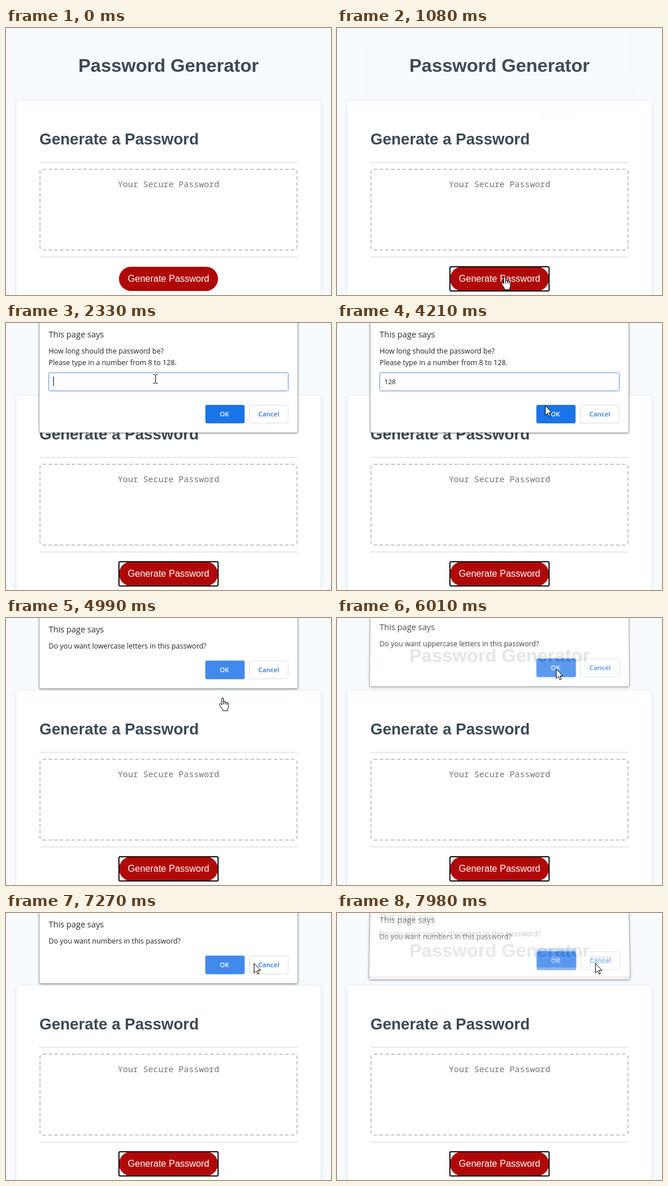
An HTML page for the animation above (8000 ms loop, 564 by 463 pixels).

```html
<!DOCTYPE html>
<html lang="en">
<head>
<meta charset="utf-8">
<title>Password Generator</title>
<style>
  html, body { margin: 0; width: 100%; height: 100%; overflow: hidden; background: #f7fbff; }
  #stage { position: relative; width: 564px; height: 463px; overflow: hidden; }
  #stage > *, .dialog svg { position: absolute; }
  svg { left: 0; top: 0; overflow: visible; }
  #card {
    left: 18px; top: 126px; width: 528px; height: 400px; border-radius: 5px; background: #fff;
    box-shadow: 0 1px 6px rgba(0,0,0,.1), 0 1px 1px rgba(0,0,0,.2);
  }
  .rule { left: 58px; width: 448px; height: 2px; background: #e7e9eb; }
  #area {
    left: 58px; top: 244px; width: 448px; height: 142px; box-sizing: border-box;
    border: 2px dashed #c2c5ca; border-radius: 6px;
  }
  #button {
    left: 196px; top: 414px; width: 172px; height: 42px; border-radius: 21px; background: #b00808;
  }
  #ring {
    left: 195px; top: 413px; width: 174px; height: 44px; box-sizing: border-box;
    border: 2px solid #101010; border-radius: 3px;
  }
  .head { font-family: "Liberation Sans", Arial, sans-serif; font-weight: bold; fill: #3b4954; }
  .label { font: 16px "Liberation Sans", Arial, sans-serif; fill: #fff; }
  .mono { font: 14.67px "Noto Sans Mono", monospace; fill: #757575; }
  .dialog {
    left: 58px; top: -20px; width: 448px; background: #fff; border-radius: 2px;
    transform-origin: 50% 20px;
    box-shadow: 0 0 0 1px rgba(0,0,0,.2), 0 1px 4px rgba(0,0,0,.45);
  }
  .dialog svg { left: -58px; top: 20px; }
  .dialog text { font: 12.3px "Open Sans", "Noto Sans", sans-serif; fill: #202124; }
  .dialog .says { font-size: 14.3px; fill: #2b2d30; }
  .dialog .btn { font-size: 11.4px; font-weight: 600; text-anchor: middle; }
  .dialog .digits { font-size: 11.6px; }
</style>
</head>
<body>
<div id="stage">
  <svg width="564" height="463">
    <text class="head" x="282" y="76" font-size="32" text-anchor="middle">Password Generator</text>
  </svg>
  <div id="card"></div>
  <div class="rule" style="top:232px"></div>
  <div id="area"></div>
  <div class="rule" style="top:396px"></div>
  <div id="button"></div>
  <div id="ring"></div>
  <svg width="564" height="463">
    <text class="head" x="58" y="202" font-size="27.2">Generate a Password</text>
    <text class="mono" x="282" y="276" text-anchor="middle">Your Secure Password</text>
    <text class="label" x="282" y="440" text-anchor="middle">Generate Password</text>
  </svg>
  <svg id="pointer" width="564" height="463">
    <path id="arrow" d="M.5 .5V17L4.3 13.4L6.8 19L9.2 18L6.8 12.4H12Z" fill="#fff" stroke="#000"/>
    <g id="hand" transform="translate(-6.5 0)" fill="#fff" stroke="#000" stroke-linejoin="round">
      <path d="M5 12.5V2a1.5 1.5 0 0 1 3 0V8c0-1.6 3-1.6 3 0V9c0-1.5 3-1.5 3 0V10c0-1.4 2.6-1.4 2.6 .2V15c0 3-1.6 4-1.6 7.8H6.5c0-3-2-4.300-3.300-6.600L1 12.600c-1-1.800 1-2.800 2.200-1.600Z"/>
      <path d="M8 8V12M11 9V12M14 10V12.500" fill="none"/>
    </g>
    <path id="beam" d="M-3.500-7.500H-1L.5-6.500L2-7.500H4.500M.5-6.500V6.500M-3.500 7.500H-1L.5 6.500L2 7.500H4.500" fill="none" stroke="#000"/>
  </svg>
</div>
<script>
const LOOP = 8000, TICK = 78.125, SLIDE = 210, LAG = 58;
const $ = id => document.getElementById(id);
const clamp = v => Math.max(0, Math.min(1, v));

const ask = what => [`Do you want ${what} in this password?`];
const dialogs = [
  { start: 1034, lines: ["How long should the password be?", "Please type in a number from 8 to 128."], field: true },
  { start: 4490, lines: ask("lowercase letters") },
  { start: 5800, lines: ask("uppercase letters") },
  { start: 6718, lines: ask("numbers") },
  { start: 7868, lines: ask("special characters") }
];

// time, x, y of the pointer's hot spot
const path = [
  [450, 415, 452], [860, 291, 431], [1094, 291, 431], [1790, 258, 81],
  [1870, 258, 83], [2010, 258, 83], [2344, 259, 97], [3780, 259, 97],
  [4219, 361, 143], [4490, 376, 149], [4922, 376, 149], [5000, 376, 138],
  [5390, 379, 87], [5600, 379, 87], [5640, 380, 88], [6100, 380, 88],
  [6400, 376, 88], [6950, 376, 88], [7420, 448, 87], [LOOP, 448, 87]
];

function build(d) {
  const h = d.field ? 190 : 122, y = h - 48;
  const box = document.createElement("div");
  box.className = "dialog";
  box.style.height = h + 20 + "px";
  const field = `
    <rect x="73.500" y="85.500" width="417" height="33" rx="3" fill="none" stroke="#c3d8f6"/>
    <rect x="74.500" y="86.500" width="415" height="31" rx="2" fill="#fff" stroke="#86aee6"/>
    <text id="digits" class="digits" x="82" y="106"></text>
    <rect id="caret" y="93" width="1" height="16" fill="#000"/>`;
  box.innerHTML = `<svg width="564" height="463">
    <text class="says" x="74" y="25">This page says</text>
    ${d.lines.map((s, i) => `<text x="74" y="${53 + 20 * i}">${s}</text>`).join("")}
    ${d.field ? field : `<rect x="345.500" y="${y - .5}" width="69" height="33" rx="3" fill="#bcd5f8"/>`}
    <rect x="346" y="${y}" width="68" height="32" rx="3" fill="${d.field ? "#1a73e8" : "#4189ec"}"/>
    <rect x="422.500" y="${y + .5}" width="67" height="31" rx="3" fill="#fff" stroke="#dadce0"/>
    <text class="btn" x="379" y="${y + 20}" style="fill:#fff">OK</text>
    <text class="btn" x="456" y="${y + 20}" style="fill:#2878de">Cancel</text>
  </svg>`;
  $("stage").insertBefore(box, $("pointer"));
  d.box = box;
}
dialogs.forEach(build);

function drawDialog(d, i, t) {
  const next = dialogs[i + 1];
  const shown = clamp((t - d.start - LAG) / SLIDE);
  const gone = next ? clamp((t - next.start) / SLIDE) : 0;
  const q = gone || 1 - shown;
  const s = d.box.style;
  s.visibility = q < 1 ? "visible" : "hidden";
  s.opacity = gone ? 1 - gone ** 2.4 : 1 - q ** 1.4;
  s.transform = q ? `perspective(500px) translateY(${-16 * q}px) rotateX(${4 * q}deg)` : "none";
}

function drawField(t) {
  const typed = [3040, 3120, 3270].filter(at => t >= at).length;
  const on = (a, b) => t >= a && t < b;
  $("digits").textContent = "128".slice(0, typed);
  $("caret").setAttribute("x", 82 + Math.round(6.64 * typed));
  $("caret").style.opacity =
    on(1250, 1780) || on(2250, 2720) || on(3040, 3800) || on(4300, 4800) ? 1 : 0;
}

function drawPointer(t) {
  const visible = t >= 450;
  $("pointer").style.display = visible ? "" : "none";
  if (!visible) return;
  const n = path.findIndex(p => p[0] > t);
  const [a, b] = [path[n - 1], path[n]];
  const u = (t - a[0]) / (b[0] - a[0]), e = u * u * (3 - 2 * u);
  const x = Math.round(a[1] + (b[1] - a[1]) * e);
  const y = Math.round(a[2] + (b[2] - a[2]) * e);
  const onButton = x > 196 && x < 368 && y > 414;
  const onField = t < 4490 && x > 74 && x < 490 && y > 86 && y < 118;
  const kind = onButton || (t > 4720 && t < 5050) ? "hand" : onField ? "beam" : "arrow";
  for (const id of ["arrow", "hand", "beam"]) $(id).style.display = id === kind ? "" : "none";
  $("pointer").style.transform = `translate(${x}px, ${y}px)`;
}

function draw(now) {
  const t = Math.min(LOOP - 1, Math.floor((now % LOOP) / TICK + .24) * TICK);
  $("ring").style.display = t >= 1000 ? "" : "none";
  dialogs.forEach((d, i) => drawDialog(d, i, t));
  drawField(t);
  drawPointer(t);
}

const begin = performance.now();
function loop() {
  draw(performance.now() - begin);
  requestAnimationFrame(loop);
}
loop();
</script>
</body>
</html>
```
